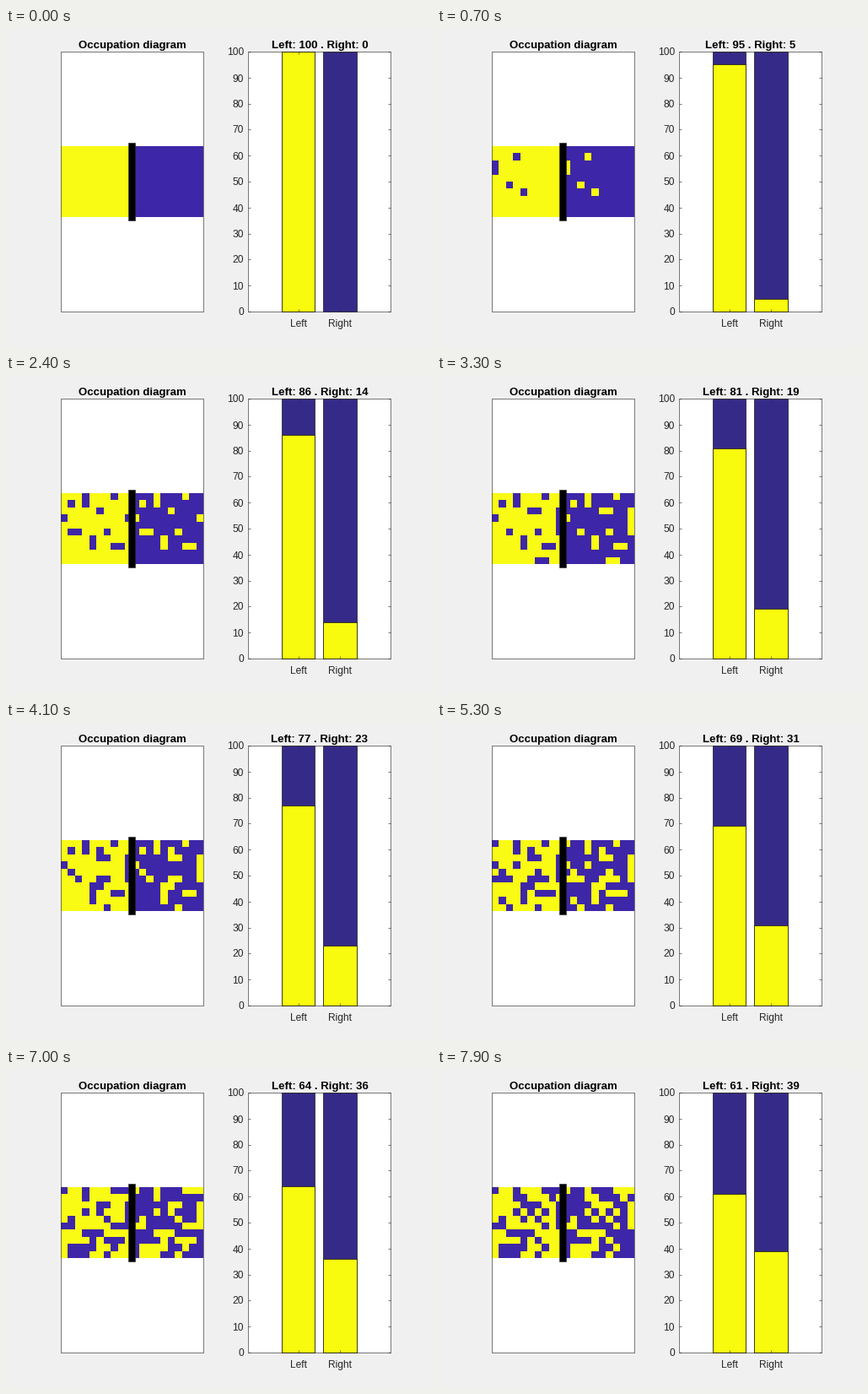
These frames come from a looping animation (504x378 px, 8000 ms). A matplotlib script:

```python
import random

import numpy as np
import matplotlib.pyplot as plt
from matplotlib.animation import FuncAnimation
from matplotlib.colors import ListedColormap
from matplotlib.patches import Rectangle

W, H = 504, 378
FRAMES = 80
SIDE = 10
TOP, BOTTOM = 28.5, 336.5
INK = "#262626"
YELLOW, BLUE = "#f9fb0e", "#352a87"

# Key points of the mixing curve: step, number of swapped pairs
STEPS = [0, 13, 24, 41, 53, 70, 79]
MIXED = [0, 9, 14, 23, 31, 36, 39]

plt.rcParams["font.family"] = "Liberation Sans"
fig = plt.figure(figsize=(W / 72, H / 72), dpi=72, facecolor="#f0f0f0")
ax = fig.add_axes([0, 0, 1, 1])
ax.axis("off")


def simulate():
    """Swap one left/right pair per step so that the count follows the curve."""
    rng = random.Random(4)
    moved = np.zeros((SIDE, SIDE), int)
    states = [moved.copy()]
    for step in range(1, FRAMES):
        grow = moved.sum() < np.interp(step, STEPS, MIXED)
        sites = np.flatnonzero(moved == (0 if grow else 1))
        moved.flat[rng.choice(sites)] ^= 1
        states.append(moved.copy())
    return states


def box(x0, y0, x1, y1, fill, edge=INK, z=1, lw=0.6):
    return ax.add_patch(Rectangle((x0, y0), x1 - x0, y1 - y0, facecolor=fill,
                                  edgecolor=edge, lw=lw, zorder=z, snap=False))


def line(xs, ys):
    ax.plot(xs, ys, color=INK, lw=0.6, zorder=6, solid_capstyle="butt", snap=False)


def label(x, y, s, align="center", size=12, **kw):
    return ax.text(x, y, s, ha=align, va="baseline", fontsize=size, **kw)


def level(value):
    """Pixel row centre of a value on the bar axis."""
    return round(BOTTOM - 0.5 - (BOTTOM - TOP) * value / 100) + 0.5


# Occupation panel
box(65.5, TOP, 234.5, BOTTOM, "white", "none")
cells = ax.imshow(np.zeros((SIDE, 2 * SIDE)),
                  cmap=ListedColormap(["#3e26a8", "#f9fb15"]),
                  vmin=0, vmax=1, extent=(65, 234, 224, 140),
                  interpolation="nearest", aspect="auto", zorder=2)
box(65.5, TOP, 234.5, BOTTOM, "none", z=3)
box(145.5, 136.5, 153.5, 228.5, "black", z=4)
label(150, 24, "Occupation diagram", size=13.2, weight="bold")

# Bar panel
box(287.5, TOP, 456.5, BOTTOM, "white", "none")
bars = []
for x0, x1, name in ((327.5, 366.5, "Left"), (376.5, 416.5, "Right")):
    box(x0, TOP, x1, BOTTOM, BLUE, "black", z=2)
    bars.append(box(x0, TOP, x1, BOTTOM, YELLOW, "black", z=3))
    mid = x0 + 20
    line([mid, mid], [BOTTOM, BOTTOM - 3])
    line([mid, mid], [TOP, TOP + 3])
    label(mid - 0.5, 354.3, name, color=INK)
box(287.5, TOP, 456.5, BOTTOM, "none", z=5)
for value in range(0, 101, 10):
    y = level(value)
    line([287.5, 290.5], [y, y])
    line([453.5, 456.5], [y, y])
    label(282, y + 4, str(value), "right", color=INK)
title = label(372, 24, "", size=13.2, weight="bold")

ax.set_xlim(0, W)
ax.set_ylim(H, 0)

states = simulate()


def update(step):
    moved = states[step]
    right = int(moved.sum())
    cells.set_data(np.hstack([1 - moved, moved]))
    for bar, count in zip(bars, (100 - right, right)):
        bar.set_y(level(count))
        bar.set_height(BOTTOM - level(count))
        bar.set_visible(count > 0)
    title.set_text(f"Left: {100 - right} . Right: {right}")
    return [cells, title, *bars]


anim = FuncAnimation(fig, update, frames=FRAMES, interval=100,
                     repeat=True, repeat_delay=0, blit=False)
plt.show()
```
